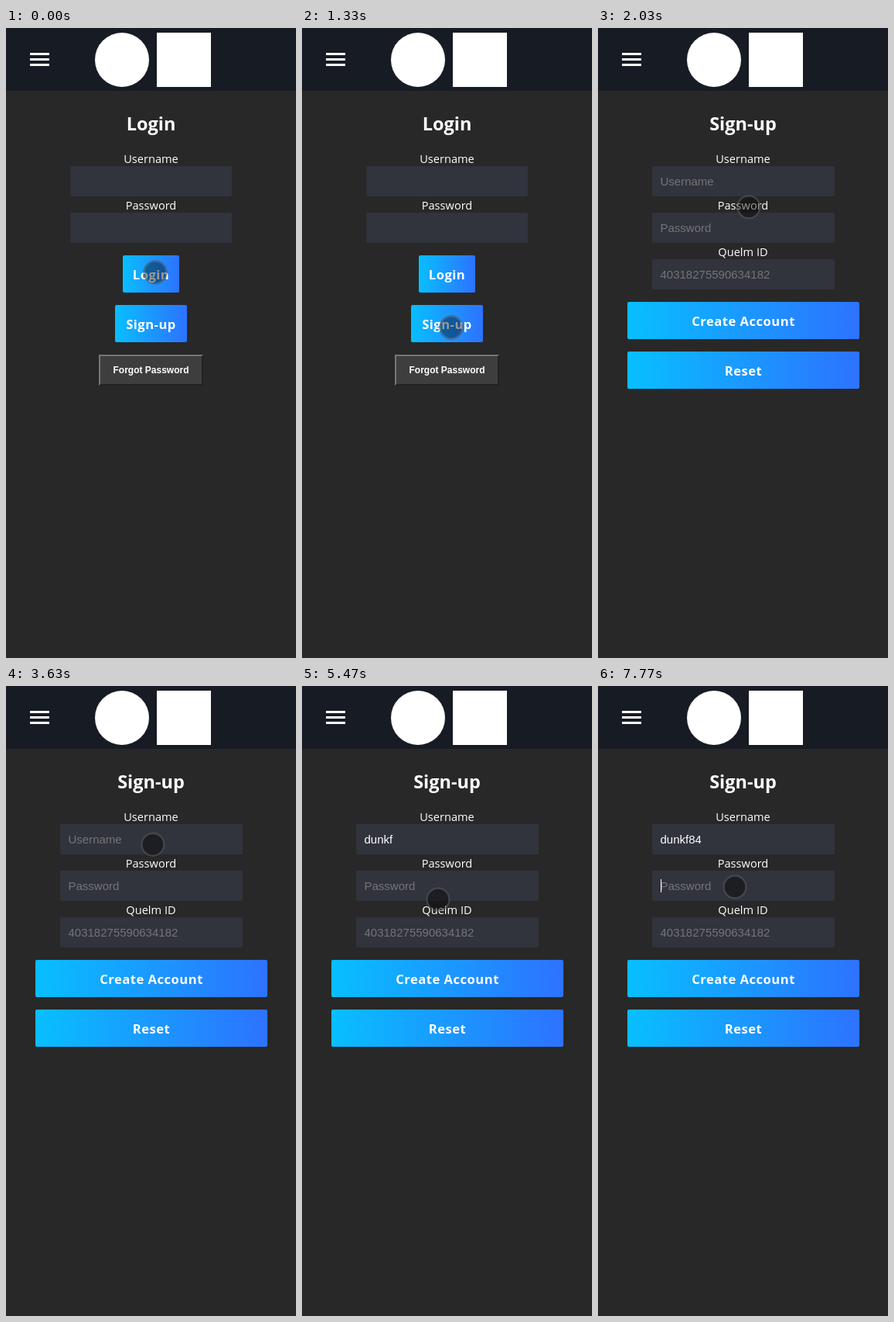
An HTML page with a canvas that plays this animation: 375x812 px, repeating every 8000 ms.

```html
<!DOCTYPE html>
<html lang="en">
<head>
<meta charset="utf-8">
<title>Sign-up</title>
<style>
  html, body { margin: 0; width: 100%; height: 100%; overflow: hidden; background: #282828; }
  canvas { display: block; width: 375px; height: 812px; }
</style>
</head>
<body>
<canvas id="stage"></canvas>
<script>
const W = 375, H = 812, LOOP = 8000, MID = 187.5;
const UI = '"Open Sans", "Noto Sans", sans-serif';
const FIELD = '15px "Liberation Sans", Arial, sans-serif';
const canvas = document.getElementById('stage');
const ctx = canvas.getContext('2d');
const dpr = window.devicePixelRatio || 1;
canvas.width = W * dpr;
canvas.height = H * dpr;

const USER = 'dunkf84';
const KEY_TIMES = [3670, 3930, 4230, 4600, 4900, 5570, 5930];
// Caret visibility as [from, to] spans
const USER_CARET = [[2630, 3170], [3670, 5470], [5570, 6470]];
const PASS_CARET = [[6670, 7200], [7770, 8000]];
// Pointer waypoints: time, x, y
const PATH = [
  [885, 193, 315], [1070, 194.5, 354.5], [1200, 196, 376], [1330, 193, 386],
  [1780, 193, 386], [1900, 199, 318], [2030, 195, 231], [2130, 192, 211],
  [3480, 192, 211], [3770, 188, 198],
  [3910, 188, 198], [4060, 186, 187], [4430, 181, 240], [4600, 176, 275],
  [5910, 176, 275], [6170, 177, 259]
];

function box(x, y, w, h, fill, r = 0) {
  ctx.fillStyle = fill;
  ctx.beginPath();
  ctx.roundRect(x, y, w, h, r);
  ctx.fill();
}

function text(str, x, y, font, fill = '#fff', align = 'center') {
  ctx.font = font;
  ctx.fillStyle = fill;
  ctx.textAlign = align;
  ctx.fillText(str, x, y);
}

function button(label, x, y, w) {
  const g = ctx.createLinearGradient(x, 0, x + w, 0);
  g.addColorStop(0, '#08bfff');
  g.addColorStop(1, '#2d72ff');
  box(x, y, w, 48, g, 2);
  ctx.letterSpacing = '0.5px';
  text(label, x + w / 2, y + 31, 'bold 16.6px ' + UI);
  ctx.letterSpacing = '0px';
}

function field(label, x, y, w, hint = '', value = '') {
  text(label, MID, y - 4, '14.6px ' + UI);
  box(x, y, w, 39, '#31333d', 2);
  text(value || hint, x + 10.5, y + 25, FIELD, value ? '#fff' : '#757575', 'left');
}

function caret(value, y) {
  ctx.font = FIELD;
  box(Math.round(80.5 + ctx.measureText(value).width), y, 1, 17, '#fff');
}

function header() {
  box(0, 0, W, 81, '#171b24');
  for (const y of [32, 39, 46]) box(31, y, 25, 3, '#fff');
  box(115, 6, 70, 70, '#fff', 35);
  box(195, 6, 70, 70, '#fff');
}

function loginPage() {
  text('Login', MID, 132, 'bold 23.5px ' + UI);
  field('Username', 83, 178, 209);
  field('Password', 83, 238, 209);
  button('Login', 151, 293, 73);
  button('Sign-up', 141, 357, 93);
  box(120, 421, 135, 40, '#222');
  ctx.fillStyle = '#767676';
  ctx.beginPath();
  ctx.moveTo(120, 461);
  ctx.lineTo(120, 421);
  ctx.lineTo(255, 421);
  ctx.lineTo(253, 423);
  ctx.lineTo(122, 423);
  ctx.lineTo(122, 459);
  ctx.fill();
  box(122, 423, 131, 36, '#3e3e3e');
  text('Forgot Password', MID, 445, 'bold 12px "Liberation Sans", Arial, sans-serif');
}

function signupPage(t) {
  const within = ([from, to]) => t >= from && t < to;
  const typed = USER.slice(0, KEY_TIMES.filter(k => t >= k).length);
  text('Sign-up', MID, 132, 'bold 23.5px ' + UI);
  field('Username', 70, 178, 236, 'Username', typed);
  field('Password', 70, 238, 236, 'Password');
  field('Quelm ID', 70, 298, 236, '40318275590634182');
  if (USER_CARET.some(within)) caret(typed, 189);
  if (PASS_CARET.some(within)) caret('', 249);
  button('Create Account', 38, 353, 300);
  button('Reset', 38, 417, 300);
}

function pointerAt(t) {
  const i = PATH.findIndex(p => p[0] > t);
  if (i === 0) return PATH[0].slice(1);
  if (i < 0) return PATH[PATH.length - 1].slice(1);
  const [t0, x0, y0] = PATH[i - 1], [t1, x1, y1] = PATH[i];
  const k = (t - t0) / (t1 - t0);
  return [x0 + (x1 - x0) * k, y0 + (y1 - y0) * k];
}

function pointer(t) {
  const [x, y] = pointerAt(t);
  ctx.beginPath();
  ctx.arc(x, y, 13.5, 0, Math.PI * 2);
  ctx.fillStyle = 'rgba(0,0,0,0.4)';
  ctx.fill();
  ctx.beginPath();
  ctx.arc(x, y, 14.5, 0, Math.PI * 2);
  ctx.strokeStyle = 'rgba(84,84,84,0.6)';
  ctx.lineWidth = 2.4;
  ctx.stroke();
}

function draw(t) {
  ctx.setTransform(dpr, 0, 0, dpr, 0, 0);
  box(0, 0, W, H, '#282828');
  header();
  if (t < 1630) loginPage();
  else signupPage(t);
  pointer(t);
}

const start = performance.now();
function tick() {
  draw((performance.now() - start) % LOOP);
  requestAnimationFrame(tick);
}
tick();
</script>
</body>
</html>
```
